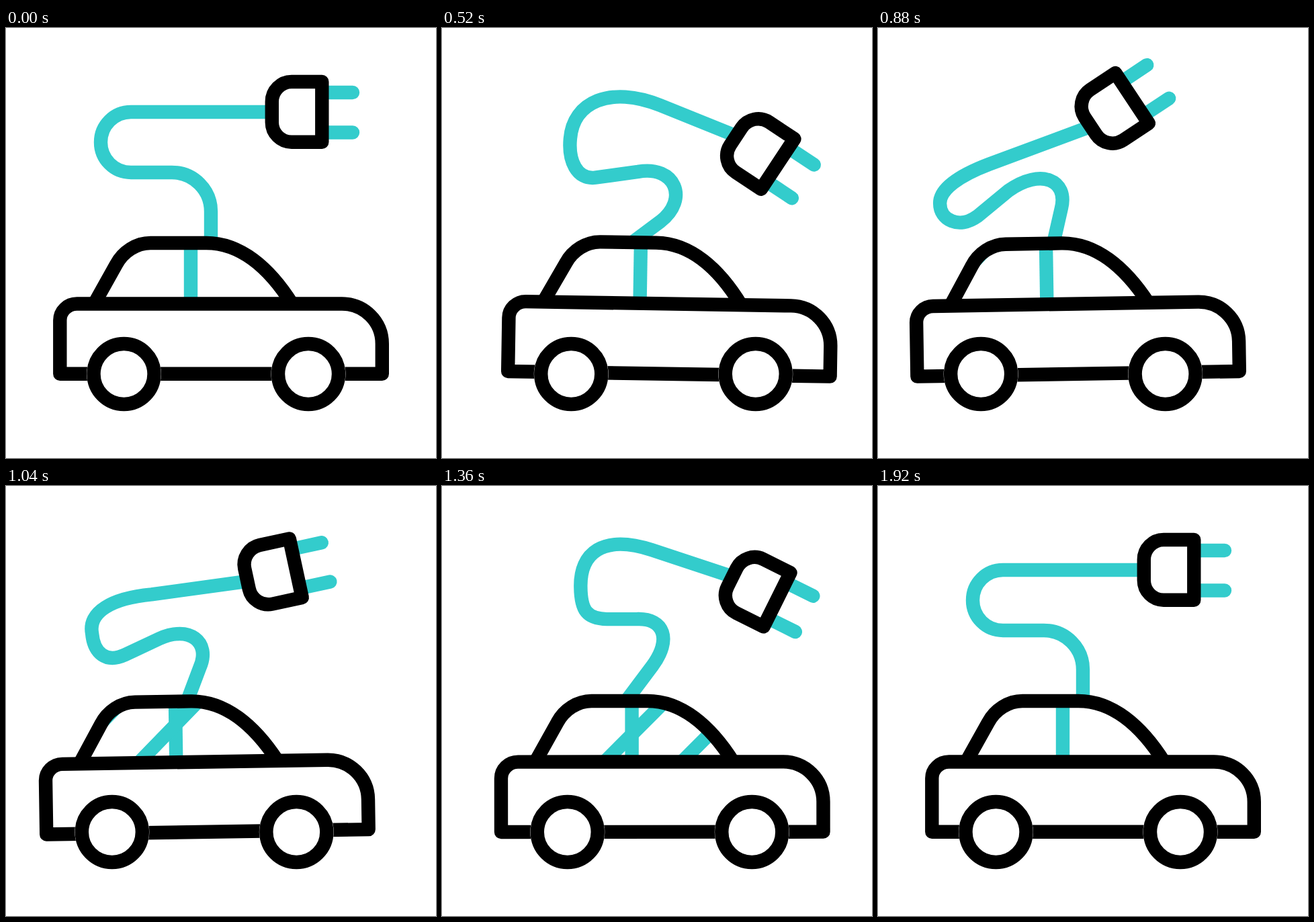
Animation, 640 px wide and 640 px high, one loop 2000 ms. Source, as an HTML page:

```html
<!DOCTYPE html>
<html lang="en">
<head>
<meta charset="utf-8">
<title>Electric car</title>
<style>
  :root {
    --smooth: cubic-bezier(.333, 0, .667, 1);
    --in: cubic-bezier(.333, 0, .667, .5);
    --out: cubic-bezier(.333, .5, .667, 1);
  }
  html, body { margin: 0; width: 100%; height: 100%; overflow: hidden; background: #fff; }
  svg { display: block; width: 100%; height: 100%; }
  path, circle { fill: none; stroke: #000; stroke-width: 20.4; stroke-linejoin: round; }
  .teal { stroke: #33cccc; }
  .white { fill: #fff; }
  .gap { fill: #fff; stroke: none; }

  .body, .wheels, .cable, .plug, .shine { animation: 2s var(--smooth) infinite; }
  .body { transform-origin: 320px 515px; animation-name: drive, rock; }
  .wheels { animation-name: roll; }
  .plug { transform-origin: 355px 208px; animation-name: drift, swing; }
  .cable { animation-name: bend; }
  .shine { animation-name: sweep; animation-timing-function: linear; }

  @keyframes drive {
    0%, 4%, 94.5%, 100% { translate: 0px; }
    23% { translate: 19.7px; }
    47% { translate: -23.8px; }
    70.85% { translate: 9px; }
  }
  @keyframes rock {
    0%, 4%, 70.85%, 100% { rotate: 0deg; }
    23% { rotate: 1deg; }
    47% { rotate: -1deg; }
  }
  @keyframes roll {
    0%, 4%, 94.5%, 100% { translate: 0px; }
    23% { translate: 18.6px; }
    47% { translate: -24.2px; }
    60% { translate: -4.4px; animation-timing-function: var(--out); }
    70.85% { translate: 12px; }
  }
  @keyframes swing {
    0%, 94.5%, 100% { rotate: 0deg; }
    4% { rotate: 0deg; animation-timing-function: var(--in); }
    10% { rotate: 7.7deg; animation-timing-function: var(--out); }
    23% { rotate: 36.7deg; }
    47% { rotate: -36.7deg; animation-timing-function: var(--in); }
    60% { rotate: .4deg; animation-timing-function: var(--out); }
    72.5% { rotate: 29deg; }
  }
  @keyframes drift {
    0%, 94.5%, 100% { translate: 0px 0px; }
    4% { translate: 0px 0px; animation-timing-function: var(--in); }
    10% { translate: .6px -.7px; animation-timing-function: var(--out); }
    23% { translate: 4px -1.4px; }
    47% { translate: -28.4px 30.8px; animation-timing-function: var(--in); }
    60% { translate: -13.9px 14.2px; animation-timing-function: var(--out); }
    72.5% { translate: 5px -18.6px; }
  }
  @keyframes bend {
    0%, 94.5%, 100% {
      d: path("M305 320 L305 273 C305 241 279 215 247 215 L186 215 C161 215 141 195 141 170 C141 145 161 125 186 125 L396 125");
    }
    4% {
      d: path("M305 320 L305 273 C305 241 279 215 247 215 L186 215 C161 215 141 195 141 170 C141 145 161 125 186 125 L396 125");
      animation-timing-function: var(--in);
    }
    10% {
      d: path("M300 318 L312 271 C320 239 296 211 260 212 L195 213 C173 214 154 194 154 166 C153 138 177 115 210 117 L407 130.5");
      animation-timing-function: var(--out);
    }
    23% {
      d: path("M287 317 L327.5 289 C372 256 352 204 296.5 212.5 L232 220 C204 222.5 192.5 193 195.5 160.5 C200 104 256 79 332.5 111 L443 161");
    }
    47% {
      d: path("M260 320 L270.5 267 C279 225.5 238 208 189.5 243.5 L144 283 C117 303.5 87.5 290 87.5 265.5 C87 246 116 225.5 157.5 207 L308 147");
      animation-timing-function: var(--in);
    }
    60% {
      d: path("M275 319 L298 271 C318 236 291 206 248 219 L194 235 C165 244 153 227 149 196 C140 158 178 137 247 138 L382 139.5");
      animation-timing-function: var(--out);
    }
    72.5% {
      d: path("M275 318.5 L314.5 267.5 C345 227.5 334 196 295 196 L250.5 194.5 C221 193 212 181.5 212 145.5 C212 94.5 244.5 65 319 91 L436 134");
    }
  }
  @keyframes sweep {
    0%, 40% { translate: -58px; }
    44% { translate: 0px; }
    60% { translate: 233px; }
    80% { translate: 555px; }
    85%, 100% { translate: 640px; }
  }
</style>
</head>
<body>
<svg viewBox="0 0 640 640">
  <defs>
    <clipPath id="window">
      <path d="M131 411 L164 352 C174 333 194 320 215 320 H298 C349 320 392 357 426 411 Z"/>
    </clipPath>
  </defs>

  <path class="cable teal" d="M305 320 L305 273 C305 241 279 215 247 215 L186 215 C161 215 141 195 141 170 C141 145 161 125 186 125 L396 125"/>

  <g class="plug">
    <path class="teal" stroke-linecap="round" d="M472 96 H516 M472 155.5 H516"/>
    <path class="white" d="M470.3 80 V169.7 H425 C409 169.7 395.8 156.5 395.8 140.5 V109.5 C395.8 93.5 409 80 425 80 Z"/>
  </g>

  <g class="body">
    <g clip-path="url(#window)">
      <path class="teal" d="M275 322 V408"/>
      <path class="shine teal" d="M223 290 L83 430 M108 290 L-32 430 M-7 290 L-147 430"/>
    </g>
    <path d="M131 411 L164 352 C174 333 194 320 215 320 H298 C349 320 392 357 426 411"/>
    <path class="white" d="M80.3 514.8 H559.8 V470 C559.8 437 533 410.5 500 410.5 H105.5 C91.5 410.5 80.3 421.5 80.3 435 Z"/>
  </g>

  <g class="wheels">
    <circle class="gap" cx="175.5" cy="515" r="55.5"/>
    <circle class="gap" cx="450" cy="515" r="55.5"/>
    <circle class="white" cx="175.5" cy="515" r="45"/>
    <circle class="white" cx="450" cy="515" r="45"/>
  </g>
</svg>
<script>
  // Advance every animation in 40 ms steps.
  const LOOP = 2000, STEP = 40;
  const animations = document.getAnimations();
  animations.forEach(a => a.pause());

  function tick() {
    const time = Math.floor(performance.now() % LOOP / STEP) * STEP;
    animations.forEach(a => { a.currentTime = time; });
    requestAnimationFrame(tick);
  }
  tick();
</script>
</body>
</html>
```
